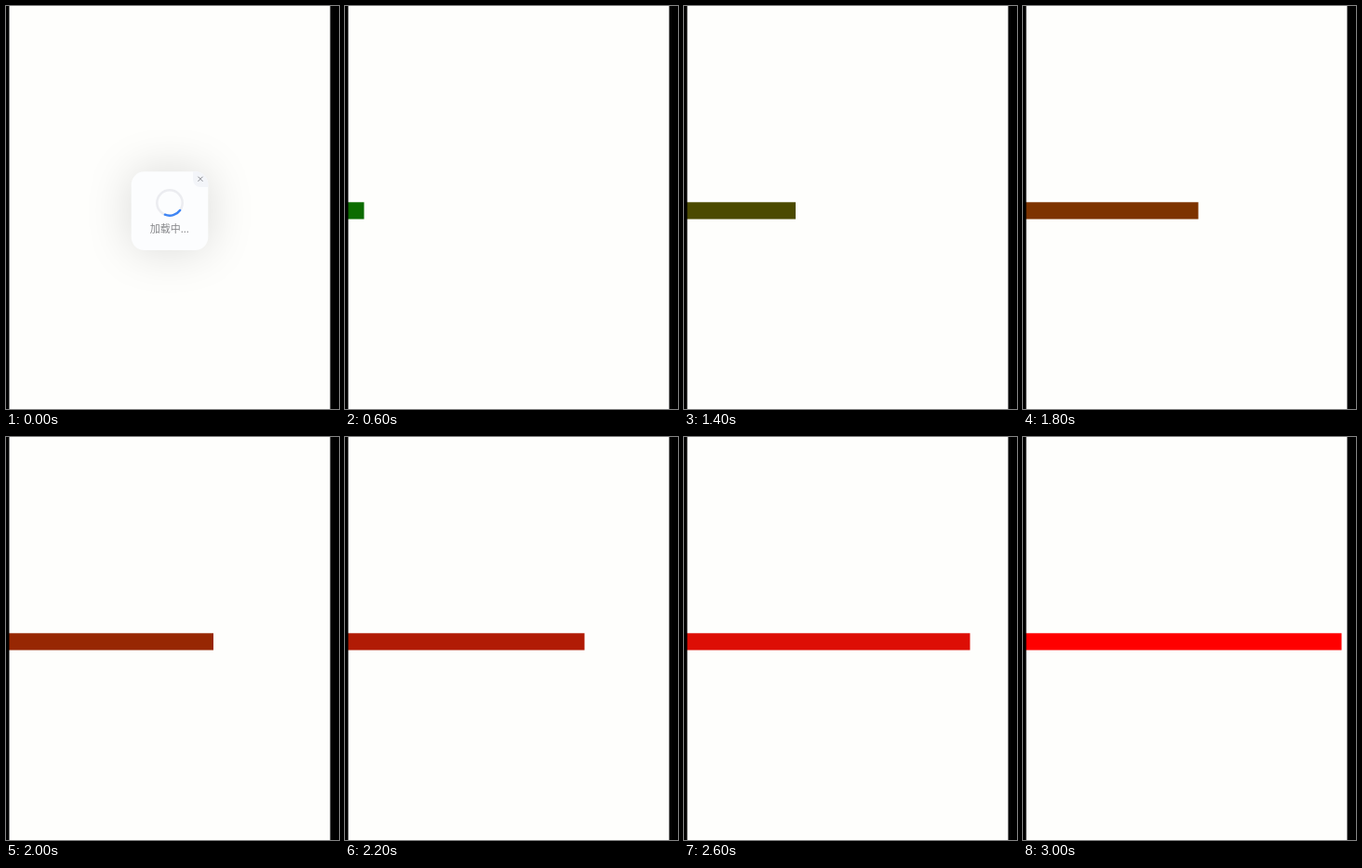
An HTML page with a canvas for the animation above (3.2 s loop, 358 by 434 pixels).

```html
<!DOCTYPE html>
<html lang="zh-CN">
<head>
<meta charset="utf-8">
<style>
html, body { margin: 0; width: 100%; height: 100%; overflow: hidden; background: #fefefc; }
canvas { display: block; width: 358px; height: 434px; }
</style>
</head>
<body>
<canvas id="stage"></canvas>
<script>
const W = 358, H = 434, LOOP = 3200, STEP = 200;
const canvas = document.getElementById('stage');
const ratio = window.devicePixelRatio || 1;
canvas.width = W * ratio;
canvas.height = H * ratio;
const ctx = canvas.getContext('2d');
ctx.scale(ratio, ratio);

// Right edge of the bar at each step, starting with step 2
const edges = [7, 20.5, 38, 63, 90, 120, 155, 188.5, 223, 257.5, 283, 307.5, 328, 342.5];
// Bar colour stops: step, r, g, b
const stops = [
  [2, 4, 118, 0], [3, 12, 108, 0], [7, 75, 74, 0], [9, 125, 51, 0],
  [11, 177, 27, 5], [13, 221, 14, 5], [15, 255, 0, 0]
];

function barColor(step) {
  let i = 0;
  while (i < stops.length - 2 && step > stops[i + 1][0]) i++;
  const a = stops[i], b = stops[i + 1];
  const k = (step - a[0]) / (b[0] - a[0]);
  const mix = n => Math.round(a[n] + (b[n] - a[n]) * k);
  return `rgb(${mix(1)},${mix(2)},${mix(3)})`;
}

function rect(x, y, w, h, color) {
  ctx.fillStyle = color;
  ctx.fillRect(x, y, w, h);
}

function rounded(x, y, w, h, radii, color) {
  ctx.beginPath();
  ctx.roundRect(x, y, w, h, radii);
  ctx.fillStyle = color;
  ctx.fill();
}

function arc(from, to, width, color) {
  ctx.beginPath();
  ctx.arc(176, 212, 13.7, from * Math.PI / 180, to * Math.PI / 180);
  ctx.lineWidth = width;
  ctx.strokeStyle = color;
  ctx.stroke();
}

function drawLoader() {
  ctx.save();
  ctx.shadowColor = 'rgba(0,0,0,0.15)';
  ctx.shadowBlur = 50 * ratio;
  rounded(134.7, 178.3, 82.6, 84.7, 14, '#fcfdfe');
  ctx.restore();
  rounded(201, 178.3, 16.3, 16.7, [0, 14, 0, 8], '#f3f5f9');

  ctx.lineCap = 'round';
  ctx.lineWidth = 1;
  ctx.strokeStyle = '#8c8e94';
  ctx.beginPath();
  ctx.moveTo(206.7, 184);
  ctx.lineTo(211.3, 188.6);
  ctx.moveTo(211.3, 184);
  ctx.lineTo(206.7, 188.6);
  ctx.stroke();

  arc(0, 360, 2.5, '#ebecf0');
  arc(36, 112, 2.5, '#3f86f5');

  ctx.fillStyle = '#858689';
  ctx.font = '11px "Noto Sans CJK SC", "Noto Sans CJK", sans-serif';
  ctx.textAlign = 'center';
  ctx.fillText('加载中...', 175.8, 244);
}

function draw(time) {
  const step = Math.floor((time % LOOP) / STEP);
  rect(0, 0, W, H, '#fefefc');
  if (step === 0) drawLoader();
  if (step >= 2) rect(3, 211.3, edges[step - 2] - 3, 18.2, barColor(step));
  rect(0, 0, 3.5, H, '#000');
  rect(348.5, 0, 9.5, H, '#000');
}

function tick() {
  draw(performance.now());
  requestAnimationFrame(tick);
}
tick();
</script>
</body>
</html>
```
